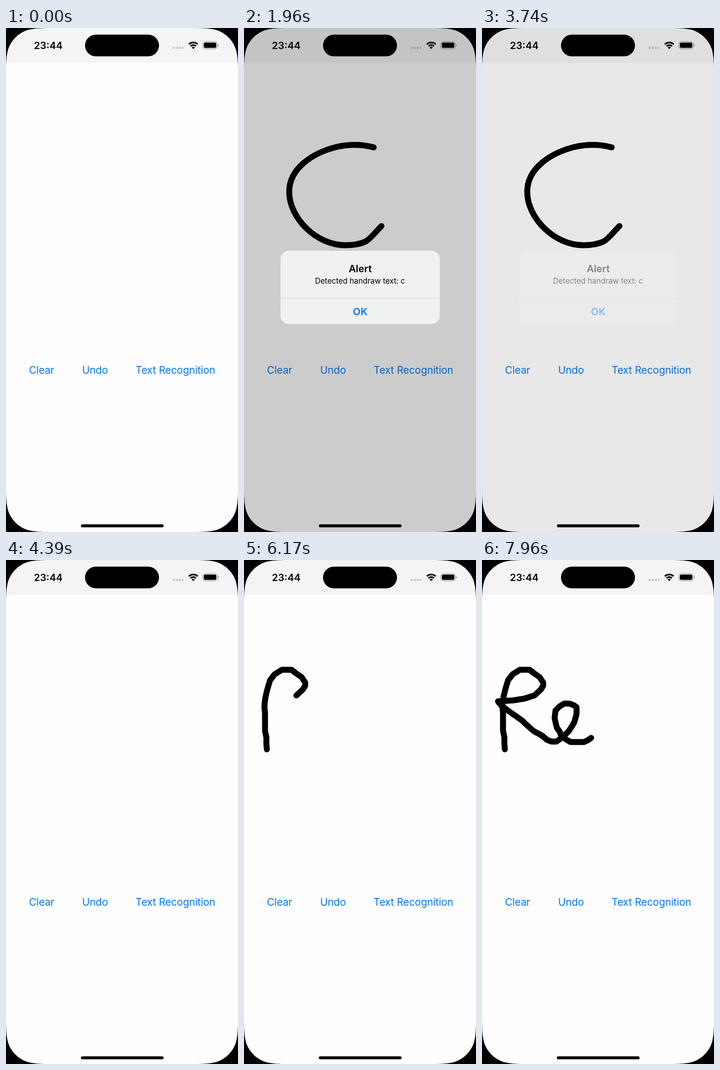
An HTML page for the animation above (8 s loop, 508x1102 px).

```html
<!DOCTYPE html>
<html lang="en">
<head>
<meta charset="utf-8">
<title>Handwriting recognition</title>
<style>
  html, body { margin: 0; width: 100%; height: 100%; overflow: hidden; background: #000; }
  svg { display: block; width: 100vw; height: 100vh; }
  text { font-family: Inter, "Open Sans", sans-serif; }

  .buttons text { font-size: 22.3px; letter-spacing: -.1px; fill: #0479f4; text-anchor: middle; }
  .alert text { text-anchor: middle; }
  .bold { font-weight: 600; }

  .ink { fill: none; stroke: #000; stroke-width: 13; stroke-linecap: round; stroke-linejoin: round; }

  /* Everything shares one 8 s loop. */
  .anim { animation: 8s linear infinite; }
  .rough { stroke-dasharray: 517 2000; animation-name: draw-c, show-rough; animation-timing-function: linear, step-end; animation-duration: 8s; }
  .smooth { animation-name: show-smooth; animation-timing-function: step-end; }
  .word { stroke-dasharray: 802 3000; animation-name: draw-word, show-word; animation-timing-function: linear, step-end; animation-duration: 8s; }
  .recognize { animation-name: tap-recognize; }
  .clear { animation-name: tap-clear; }
  .dim { animation-name: dim; }
  .alert { animation-name: alert; transform-origin: 254.5px 567px; }
  .pressed { animation-name: press-ok; animation-timing-function: step-end; }

  @keyframes draw-c {
    0%, 7.4% { stroke-dashoffset: 517; }
    14.625% { stroke-dashoffset: 42; }
    16.875%, 100% { stroke-dashoffset: 0; }
  }
  @keyframes show-rough { 0% { opacity: 0; } 7.625% { opacity: 1; } 18%, 100% { opacity: 0; } }
  @keyframes show-smooth { 0% { opacity: 0; } 18% { opacity: 1; } 52%, 100% { opacity: 0; } }

  @keyframes draw-word {
    0%, 69.8% { stroke-dashoffset: 802; }
    77.125% { stroke-dashoffset: 516; }
    78.875%, 80% { stroke-dashoffset: 434.5; }
    90.25% { stroke-dashoffset: 240; }
    99.5%, 100% { stroke-dashoffset: 0; }
  }
  @keyframes show-word { 0% { opacity: 0; } 70.125%, 100% { opacity: 1; } }

  @keyframes tap-recognize {
    0%, 20.12% { opacity: 1; }
    20.125%, 20.625% { opacity: .2; animation-timing-function: ease-in-out; }
    23.75%, 100% { opacity: 1; }
  }
  @keyframes tap-clear {
    0%, 51.37% { opacity: 1; }
    51.375%, 52% { opacity: .2; animation-timing-function: ease-in-out; }
    54.875%, 100% { opacity: 1; }
  }
  @keyframes dim {
    0%, 21% { opacity: 0; animation-timing-function: ease-out; }
    24.5%, 45.125% { opacity: .197; animation-timing-function: ease-out; }
    49.25%, 100% { opacity: 0; }
  }
  @keyframes alert {
    0%, 21% { opacity: 0; transform: scale(1.18); animation-timing-function: ease-out; }
    24.5%, 45.125% { opacity: 1; transform: none; animation-timing-function: ease-out; }
    49.25%, 100% { opacity: 0; transform: none; }
  }
  @keyframes press-ok { 0% { opacity: 0; } 43.5% { opacity: 1; } 45.125%, 100% { opacity: 0; } }
</style>
</head>
<body>
<svg viewBox="0 0 508 1102" preserveAspectRatio="none">
  <defs>
    <path id="corner" d="M0 0H108.5C77.3 0 61.7 0 44.8 5.3C26.5 12 12 26.5 5.3 44.8C0 61.7 0 77.3 0 108.5Z"/>
  </defs>

  <rect width="508" height="1102" fill="#fefefe"/>
  <rect width="508" height="76" fill="#f4f4f4"/>

  <!-- Status bar -->
  <text class="bold" x="92.5" y="46" font-size="21.6" text-anchor="middle">23:44</text>
  <path d="M367 43.5h24" stroke="#c4c4c4" stroke-width="4.6" stroke-dasharray="4.6 2.3" transform="translate(-2.4)"/>
  <g fill="none" stroke="#000" stroke-width="3.5">
    <path d="M400.2 35.5A14.4 14.4 0 0 1 419.8 35.5M404 39.6A8.8 8.8 0 0 1 416 39.6"/>
    <path d="M410 46L406.5 42.4A5 5 0 0 1 413.5 42.4Z" fill="#000" stroke="none"/>
  </g>
  <rect x="431" y="29.5" width="31.5" height="16.2" rx="5.3" fill="none" stroke="#999" stroke-width="1.2"/>
  <rect x="433.2" y="31.7" width="27.2" height="11.9" rx="3.3"/>
  <path d="M464 35v5.4q2-.7 2-2.7t-2-2.7" fill="#999"/>

  <!-- Canvas strokes -->
  <path class="ink anim rough" pathLength="517" d="M284 261L268 257 255 256 220 256 205 260 175 268 155 276 137 287 125 298 110 316 98 342 97 355 101 384 108 402 120 422 135 437 157 454 170 460 185 466 213 471 255 471 271 463 283 453 301 433"/>
  <path class="ink anim smooth" d="M284 261C258 254 230 254 203 260C150 273 99 307 99 358C99 415 158 475 222 475C240 475 255 472 266 467C278 460 287 447 301 433"/>
  <path class="ink anim word" pathLength="802" d="M50 414L49 402 49 388 46 373 46 335 45 325 45 315 47 300 51 283 57 263 67 250 75 245 83 240 104 240 113 247 126 256 134 268 134 275 129 283 115 296 93 303 68 307 35 309 38 313 42 318 55 328 88 351 95 358 113 374 128 382 134 386 142 393 152 397 163 397 177 387 190 374 196 365 202 355 207 337 207 322 202 318 192 314 180 314 170 320 161 329 159 345 161 355 164 367 170 375 173 383 185 393 194 398 223 398 232 394 239 389"/>

  <g class="buttons">
    <text class="anim clear" x="78" y="756">Clear</text>
    <text x="195" y="756">Undo</text>
    <text class="anim recognize" x="371" y="756">Text Recognition</text>
  </g>

  <rect class="anim dim" width="508" height="1102"/>

  <g class="anim alert">
    <rect x="80" y="487" width="348.5" height="160.5" rx="18" fill="#f0f1f1"/>
    <path class="anim pressed" d="M80 590.5H428.5V629.5a18 18 0 0 1-18 18H98a18 18 0 0 1-18-18Z" fill="#dcdedc"/>
    <path d="M80 590.3H428.5" stroke="#cbcccc"/>
    <text class="bold" x="254.5" y="533.5" font-size="21.6">Alert</text>
    <text x="254" y="559" font-size="16.6">Detected handraw text: c</text>
    <text class="bold" x="254.5" y="628" font-size="22" fill="#007aff">OK</text>
  </g>

  <!-- Device cutouts -->
  <rect x="173" y="14.5" width="162" height="47.5" rx="23.75"/>
  <rect x="164" y="1085.3" width="181" height="6.4" rx="3.2"/>
  <use href="#corner"/>
  <use href="#corner" transform="translate(508) scale(-1 1)"/>
  <use href="#corner" transform="translate(0 1102) scale(1 -1)"/>
  <use href="#corner" transform="translate(508 1102) scale(-1 -1)"/>
</svg>
</body>
</html>
```
